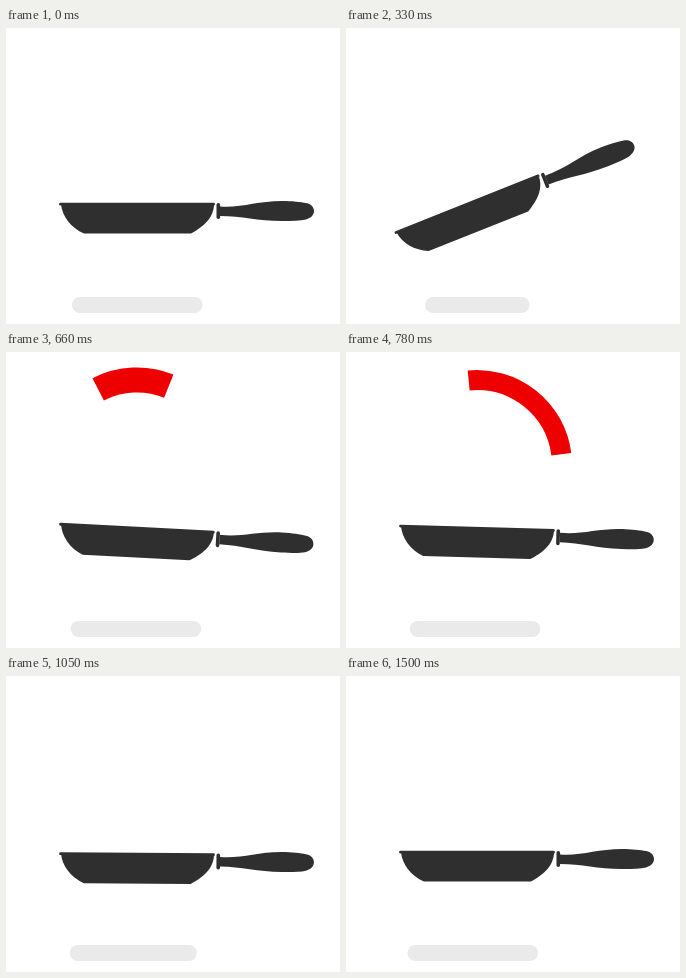
Recreate the animation shown at these times as an HTML page with a canvas. Size 334 by 296 pixels, loop 1650 ms.

```html
<!DOCTYPE html>
<html lang="en">
<head>
<meta charset="utf-8">
<title>Pan flip loader</title>
<style>
  html, body { margin: 0; width: 100%; height: 100%; overflow: hidden; background: #fff; }
  canvas { display: block; }
</style>
</head>
<body>
<canvas id="stage" width="334" height="296"></canvas>
<script>
const ctx = document.getElementById('stage').getContext('2d');
const LOOP = 1650, STEP = 30, MOTION_END = 1500;
const TOSS = 330, CATCH = 510, APEX = 669;
const DARK = '#2f2f2f', RED = '#ee0000', GREY = '#eaeaea';
const RAD = Math.PI / 180;

const progress = (t, start, end) => Math.min(1, Math.max(0, (t - start) / (end - start)));
const easeOut = (p, power) => 1 - (1 - p) ** power;
const easeInOut = p => (1 - Math.cos(Math.PI * p)) / 2;

// Front end of the pancake, in degrees: slows towards the apex, then drops.
function headAngle(t) {
  return 132 + 160 * easeOut(progress(t, 370, APEX), 2.3)
    + 116 * easeOut(progress(t, APEX, 910), 1.2);
}

// The back end makes the same flight, mirrored in time and space.
const tailAngle = t => 540 - headAngle(2 * APEX - t);

const panBody = new Path2D('M-76 0C-75 12-66 24-53 29.5H54C66 23 77 14 77 0Z');
const handle = new Path2D('M83 2.5C105 4 120-3 145-3C155-3 164-2 169-1C175 0 177 4 177 7C177 11 174 14 169 15.5C163 17 155 17 145 17C120 17 105 12 83 12Z');
const rim = new Path2D('M-76.5 0.2H76.5');
const collar = new Path2D('M81.3 0.8V13.2');

function strokePath(path, width) {
  ctx.lineWidth = width;
  ctx.stroke(path);
}

function drawShadow(center, halfWidth) {
  ctx.fillStyle = GREY;
  ctx.beginPath();
  ctx.roundRect(center - halfWidth, 269, 2 * halfWidth, 16, 8);
  ctx.fill();
}

function drawPancake(t) {
  const tail = tailAngle(t), head = headAngle(t);
  if (head - tail < 0.1) return;
  ctx.strokeStyle = RED;
  ctx.lineCap = 'butt';
  ctx.lineWidth = 15.5 + 9.5 * Math.exp(-(((t - APEX) / 130) ** 2));
  ctx.beginPath();
  ctx.arc(131, 113, 85, tail * RAD, head * RAD);
  ctx.stroke();
}

function drawPan(x, y, angle) {
  ctx.save();
  ctx.translate(131 + x, 176 + y);
  ctx.rotate(angle * RAD);
  ctx.fillStyle = ctx.strokeStyle = DARK;
  ctx.lineCap = 'round';
  ctx.fill(panBody);
  ctx.fill(handle);
  strokePath(rim, 2.8);
  strokePath(collar, 3.6);
  ctx.restore();
}

function draw(t) {
  const swing = easeInOut(progress(t, TOSS, CATCH));
  const pull = easeInOut(progress(t, 0, TOSS)) - swing;
  const settle = Math.exp(-Math.max(0, t - CATCH) / 195);
  const bounce = Math.sin(Math.PI * progress(t, 960, MOTION_END));
  const drift = easeInOut(progress(t, TOSS, 1230));

  ctx.clearRect(0, 0, 334, 296);
  drawShadow(131.3 - 4.5 * drift, 65.3 - 13 * pull - 3.5 * bounce);
  drawPancake(t);
  drawPan(-10 * pull, 4 * bounce, -21.7 * pull + 6.4 * swing * settle);
}

function tick() {
  const t = performance.now() % LOOP;
  draw(Math.min(MOTION_END, Math.floor(t / STEP) * STEP));
  requestAnimationFrame(tick);
}
tick();
</script>
</body>
</html>
```
